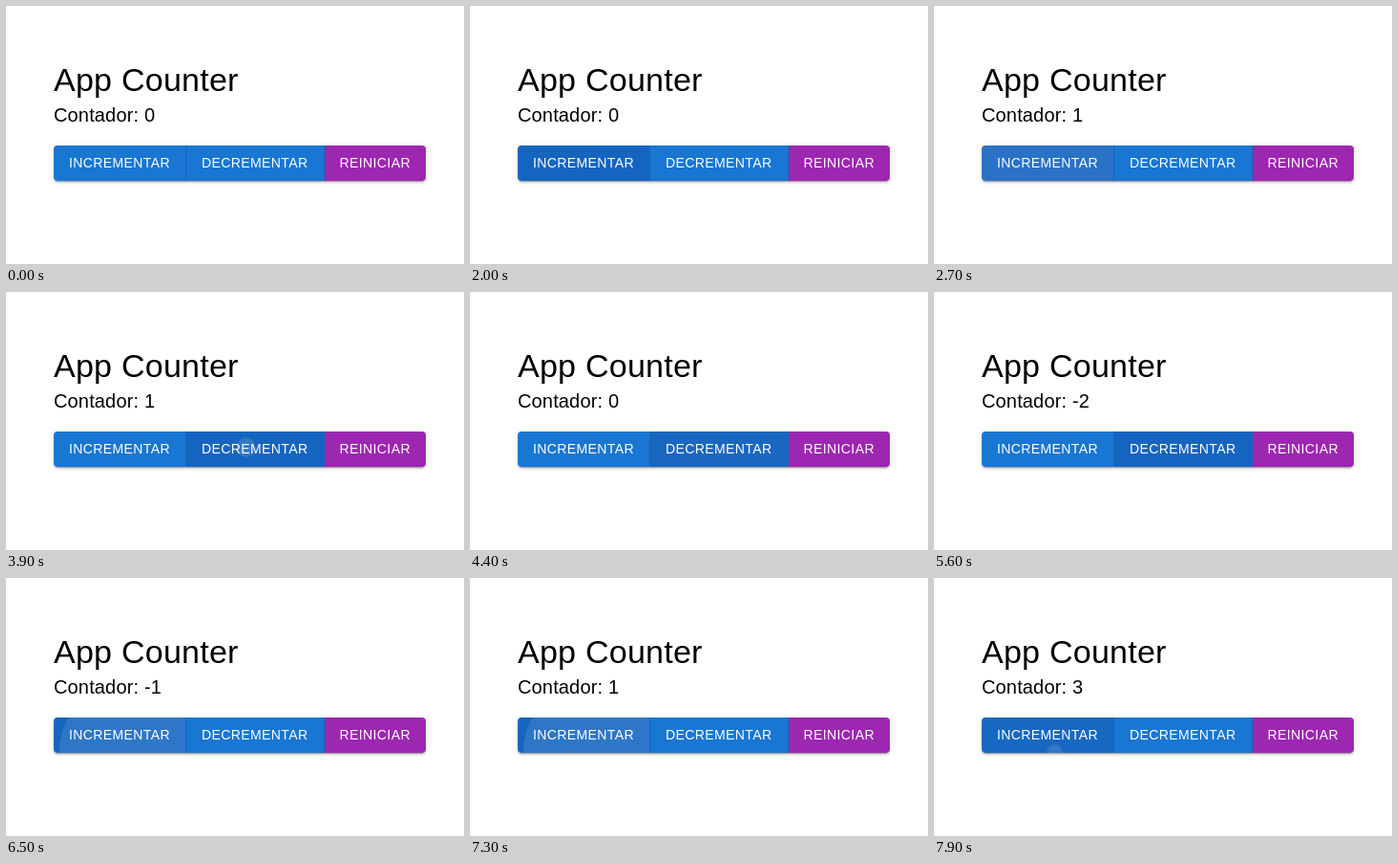
An HTML page that plays this animation: 480x270 px, repeating every 8 s.

```html
<!DOCTYPE html>
<html lang="es">
<head>
<meta charset="utf-8">
<title>App Counter</title>
<style>
  html, body { margin: 0; width: 100%; height: 100%; overflow: hidden; background: #fff; }
  body { position: relative; color: #000; font-family: "Liberation Sans", Arial, sans-serif; }
  h1, p { position: absolute; left: 50px; margin: 0; font-weight: 400; white-space: nowrap; }
  h1 { top: 56px; font-size: 34px; line-height: 42px; letter-spacing: .00735em; }
  p { top: 98px; font-size: 20px; line-height: 32px; letter-spacing: .0075em; }
  .group {
    position: absolute; left: 50px; top: 146px; display: inline-flex; border-radius: 4px;
    box-shadow: 0 3px 1px -2px rgba(0,0,0,.2), 0 2px 2px rgba(0,0,0,.14), 0 1px 5px rgba(0,0,0,.12);
  }
  .button {
    position: relative; box-sizing: border-box; padding: 6px 16px; white-space: nowrap;
    font-size: 14px; line-height: 1.75; letter-spacing: .02857em; color: #fff;
    background: #1976d2; border-right: 1px solid #1565c0;
  }
  .button:first-child { border-radius: 4px 0 0 4px; }
  .button:last-child { background: #9c27b0; border: 0; border-radius: 0 4px 4px 0; }
  .ripples { position: absolute; inset: 0; overflow: hidden; border-radius: inherit; }
  .ripples i { position: absolute; border-radius: 50%; background: #fff; opacity: 0; }
</style>
</head>
<body>
<h1>App Counter</h1>
<p>Contador: <span id="count">0</span></p>
<div class="group">
  <div class="button" id="inc">INCREMENTAR<div class="ripples"></div></div>
  <div class="button" id="dec">DECREMENTAR<div class="ripples"></div></div>
  <div class="button">REINICIAR</div>
</div>
<script>
const LOOP = 8000, HOVER_MS = 250, RIPPLE_MS = 550;
const IDLE = [25, 118, 210], HOVERED = [21, 101, 192];
const byId = id => document.getElementById(id);
const buttons = { inc: byId('inc'), dec: byId('dec') };
const counter = byId('count');

const hovers = [
  { id: 'inc', from: 1120, to: 3230 },
  { id: 'dec', from: 3230, to: 5730 },
  { id: 'inc', from: 5730, to: LOOP + HOVER_MS }
];

const press = (id, down, up, x, y) => ({ id, down, up, x, y, step: id === 'inc' ? 1 : -1 });
const presses = [
  press('inc', 1990, 2450, 76, 28),
  press('dec', 3795, 4000, 63, 17),
  press('dec', 4630, 4715, 63, 17),
  press('dec', 5020, 5105, 63, 17),
  ...[6200, 6600, 7000, 7400, 7805].map(t => press('inc', t, t + 88, 76, 36))
];

const clamp = v => Math.min(1, Math.max(0, v));

// cubic-bezier(.4, 0, .2, 1)
function ease(v) {
  const x = clamp(v);
  let lo = 0, hi = 1;
  for (let i = 0; i < 24; i++) {
    const s = (lo + hi) / 2, r = 1 - s;
    if (1.2 * r * r * s + .6 * r * s * s + s ** 3 < x) lo = s; else hi = s;
  }
  return lo * lo * (3 - 2 * lo);
}

function addRipple(p) {
  const box = buttons[p.id].querySelector('.ripples');
  const w = box.clientWidth, h = box.clientHeight;
  const size = Math.hypot(2 * Math.max(w - p.x, p.x) + 2, 2 * Math.max(h - p.y, p.y) + 2);
  p.dot = document.createElement('i');
  Object.assign(p.dot.style, {
    width: size + 'px', height: size + 'px',
    left: p.x - size / 2 + 'px', top: p.y - size / 2 + 'px'
  });
  box.append(p.dot);
}

function drawHover(id, t) {
  const amount = hovers.filter(h => h.id === id).reduce((sum, h) =>
    sum + ease((t - h.from) / HOVER_MS) - ease((t - h.to) / HOVER_MS), 0);
  const rgb = IDLE.map((c, i) => Math.round(c + (HOVERED[i] - c) * amount));
  buttons[id].style.backgroundColor = `rgb(${rgb})`;
}

function drawRipple(p, t) {
  const grow = ease((t - p.down) / RIPPLE_MS);
  const fade = 1 - ease((t - p.up) / RIPPLE_MS);
  p.dot.style.transform = `scale(${grow})`;
  p.dot.style.opacity = t < p.down ? 0 : (.1 + .2 * grow) * fade;
}

function draw(t) {
  drawHover('inc', t);
  drawHover('dec', t);
  presses.forEach(p => drawRipple(p, t));
  const total = presses.reduce((sum, p) => sum + (t >= p.up ? p.step : 0), 0);
  if (counter.textContent !== String(total)) counter.textContent = total;
}

presses.forEach(addRipple);
const start = performance.now();
function tick() {
  draw((performance.now() - start) % LOOP);
  requestAnimationFrame(tick);
}
tick();
</script>
</body>
</html>
```
